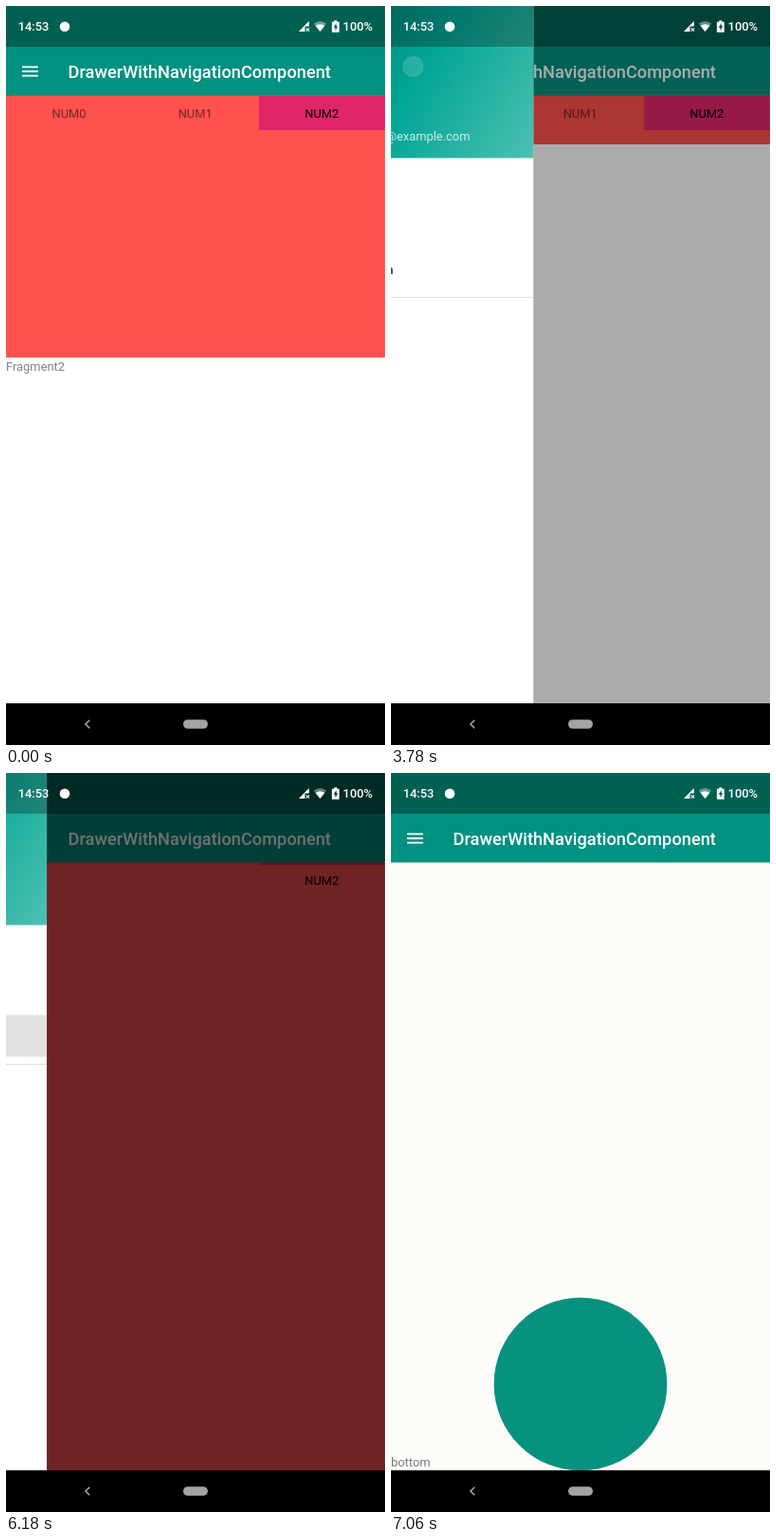
Animation of 400 by 780 pixels, one loop 8000 ms. Source, as an HTML page:

```html
<!DOCTYPE html>
<html lang="en">
<head>
<meta charset="utf-8">
<title>Drawer navigation</title>
<style>
  html, body { margin: 0; width: 100%; height: 100%; overflow: hidden; background: #fff; }
  svg { display: block; width: 400px; height: 780px; font: 400 12.9px Roboto, sans-serif; }
  .medium { font-weight: 500; }
  .tabs { text-anchor: middle; }
</style>
</head>
<body>
<svg viewBox="0 0 400 780">
  <defs>
    <linearGradient id="header" gradientUnits="userSpaceOnUse" x1="0" y1="0" x2="256" y2="160">
      <stop offset="0" stop-color="#007264"/>
      <stop offset=".5" stop-color="#00a594"/>
      <stop offset="1" stop-color="#4dc0b2"/>
    </linearGradient>
  </defs>

  <rect width="400" height="780" fill="#fff"/>
  <rect id="newPage" y="94" width="400" height="642" fill="#fdfcf8"/>

  <g id="oldPage">
    <text id="label" x="0" fill="#808080">Fragment2</text>
    <rect id="appBar" y="94" width="400" fill="#ff514e"/>
    <rect id="activeTab" x="267" y="95" width="133" fill="#e02569"/>
    <g class="tabs">
      <g id="idleTabs" fill-opacity=".54">
        <text x="66.5" y="118">NUM0</text>
        <text x="199.7" y="118">NUM1</text>
      </g>
      <text x="333.3" y="118">NUM2</text>
    </g>
  </g>

  <circle id="discShade" cx="200" cy="645" r="91.3"/>
  <g id="newContent">
    <circle cx="200" cy="645" r="91.3" fill="#07917f"/>
    <text x="0" y="732" fill="#777">bottom</text>
  </g>

  <rect y="43" width="400" height="51.4" fill="#009180"/>
  <rect y="94.4" width="400" height="1" fill-opacity=".1"/>
  <rect width="400" height="43" fill="#006052"/>
  <path d="M17 64.4H33.8M17 69H33.8M17 73.6H33.8" stroke="#fff" stroke-width="1.85"/>
  <text class="medium" x="65.5" y="76" font-size="18.24" fill="#fff">DrawerWithNavigationComponent</text>

  <rect id="scrim" width="400" height="736"/>

  <g id="drawer">
    <rect width="256" height="736" fill="#fff"/>
    <rect width="256" height="160.5" fill="url(#header)"/>
    <circle cx="47.5" cy="70.5" r="32.7" fill="#00b09c"/>
    <rect width="256" height="43" fill-opacity=".27"/>
    <text x="14.8" y="125" fill="#fff">Quorvel Bureau</text>
    <text x="14.8" y="142" fill="#fff" fill-opacity=".78">quorvel.bureau@example.com</text>
    <rect id="pressed" y="255.5" width="256" height="44" fill="#dfe1de"/>
    <rect y="307" width="256" height="1" fill="#dedede"/>
    <g id="items"></g>
  </g>

  <g fill="#fff">
    <text class="medium" x="12.7" y="26.2">14:53</text>
    <circle cx="62" cy="21.7" r="5.3"/>
    <path d="M309 27L319.8 16V21.5H315.5V27Z"/>
    <path d="M316.7 23.3l3.4 3.4m0-3.4l-3.4 3.4" stroke="#fff" stroke-width="1.1"/>
    <path d="M324.8 18.6Q331.5 13.4 338.2 18.6L331.5 27Z" fill-opacity=".4"/>
    <path d="M326.7 21Q331.5 17.6 336.3 21L331.5 27Z"/>
    <path fill-rule="evenodd" d="M346.3 15.3h3v1.4h2.4v11h-7.8v-11h2.4zM348.6 18l-2.8 4.8h1.7v3.4l2.7-4.9h-1.6z"/>
    <text class="medium" x="355.6" y="26.2">100%</text>
  </g>

  <circle id="touch" r="10.3" fill="#fff" fill-opacity=".45" stroke="#cfcfcf" stroke-opacity=".7" stroke-width="1.4"/>

  <rect y="736" width="400" height="44"/>
  <path d="M88.2 753.8L84 758l4.2 4.2" fill="none" stroke="#a6a6a6" stroke-width="1.6"/>
  <rect x="187" y="753.2" width="26" height="9.6" rx="4.8" fill="#a3a3a3"/>
</svg>

<script>
const LOOP = 8000, STEP = 80, PHASE = 20;
const DRAWER = 256, SLIDE = 1080, SCRIM = .56;
const SWIPE = 1860, MENU_TAP = 3460, ITEM_TAP = 5700;
const OPEN = 3605, CLOSE = 5856, SWAP = 6100;

const $ = id => document.getElementById(id);
const set = (id, name, value) => $(id).setAttribute(name, value);

const ring = r => `M12 ${12 - r}a${r} ${r} 0 0 0 0 ${2 * r}a${r} ${r} 0 0 0 0 ${-2 * r}z`;
const stack = 'M4 6H2v14q0 2 2 2h14v-2H4zM8 2h12q2 0 2 2v12q0 2-2 2H8q-2 0-2-2V4q0-2 2-2z';
const camera = 'M9 2L7.2 4H4q-2 0-2 2v12q0 2 2 2h16q2 0 2-2V6q0-2-2-2h-3.2L15 2z' + ring(5) + ring(3.2);
const photos = stack + 'M11 12l2 2.7L16 11l4 5H8z';
const videos = stack + 'M12 5.5v9l6-4.5z';
const wrench = 'M22.7 19l-9.1-9.1q1.3-3.9-1.5-6.9-3.2-3-7.4-1.3L9 6 6 9 1.6 4.7q-1.8 4.2 1.3 7.4 3 2.8 6.9 1.5l9.1 9.1q.7.6 1.4 0l2.3-2.3q.7-.7.1-1.4z';

const items = { Top: camera, Middle: photos, Bottom: videos, Blue: wrench, Red: wrench };
$('items').innerHTML = Object.entries(items).map(([name, icon], i) => {
  const y = 190 + 44 * i + (i > 2 ? 15.5 : 0);
  const active = name === 'Red' && '#009180';
  return `<path d="${icon}" fill="${active || '#757575'}" fill-rule="evenodd"
      transform="translate(14.6 ${y - 11.5}) scale(.926)"/>
    <text class="medium" x="65.8" y="${y + 4.6}" fill="${active || '#2b2b2b'}">${name}</text>`;
}).join('');

const ramp = (t, from, to) => Math.min(1, Math.max(0, (t - from) / (to - from)));
const smooth = p => p * p * (3 - 2 * p);
const settle = p => 1 - (1 - p) ** 5;
const slide = (t, from) => settle(ramp(t, from, from + SLIDE));

function drawTouch(t) {
  const press = (down, up, x, y) => ({ x, y, alpha: t < down ? 0 : 1 - ramp(t, up, up + 240) });
  const swipeY = 653 - 248 * smooth(ramp(t, SWIPE, SWIPE + 480));
  const touch = [
    press(SWIPE, SWIPE + 480, 289.5, swipeY),
    press(MENU_TAP, MENU_TAP + 160, 23.3, 64),
    press(ITEM_TAP, ITEM_TAP + 80, 165.5, 287)
  ].reduce((a, b) => b.alpha > a.alpha ? b : a);
  set('touch', 'cx', touch.x);
  set('touch', 'cy', touch.y);
  set('touch', 'opacity', touch.alpha);
}

function draw(t) {
  const swapped = t >= SWAP;
  const opened = slide(t, OPEN);
  const fresh = ramp(t, 6580, 7060);
  const bottom = swapped ? 736 : 371 - 225 * smooth(ramp(t, SWIPE + 80, SWIPE + 640));

  set('appBar', 'height', bottom - 94);
  set('label', 'y', bottom + 13.5);
  set('activeTab', 'height', swapped ? 2 : 36);
  set('idleTabs', 'opacity', swapped ? ramp(t, 6180, 6580) : 1);
  set('oldPage', 'opacity', 1 - ramp(t, 6240, 6996));
  set('newPage', 'opacity', fresh);
  set('newContent', 'opacity', fresh);
  set('discShade', 'opacity', .17 * ramp(t, 6340, 6580));
  set('scrim', 'opacity', SCRIM * (opened - ramp(t, 6180, 6580)));
  set('drawer', 'transform', `translate(${DRAWER * (opened - slide(t, CLOSE) - 1)} 0)`);
  set('pressed', 'opacity', t >= CLOSE ? 1 : 0);
  drawTouch(t);
}

const start = performance.now();
function tick() {
  const t = (performance.now() - start) % LOOP;
  draw(Math.max(0, Math.floor((t - PHASE) / STEP) * STEP + PHASE));
  requestAnimationFrame(tick);
}
tick();
</script>
</body>
</html>
```
